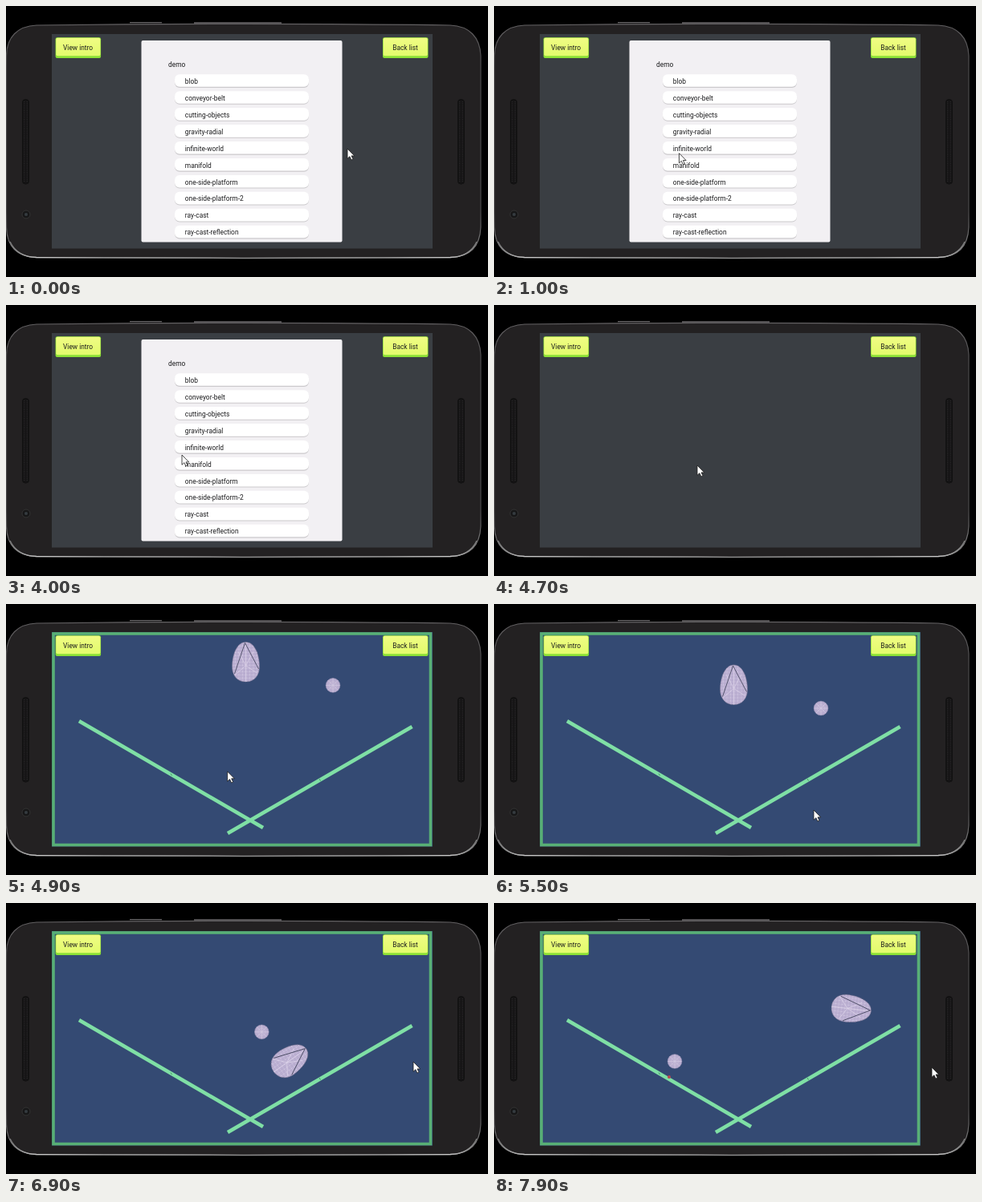
Write an HTML page that moves like this. It is 600 px wide and 338 px high and loops after 8000 ms.

```html
<!DOCTYPE html>
<html lang="en">
<head>
<meta charset="utf-8">
<title>Physics demo on a phone</title>
<style>
  html, body { margin: 0; width: 100%; height: 100%; overflow: hidden; background: #000; }
  svg { display: block; width: 600px; height: 338px; }
  text { font: 8.4px Roboto, Arial, sans-serif; fill: #1c1c1e; }
</style>
</head>
<body>
<svg viewBox="0 0 600 338">
  <defs>
    <linearGradient id="rim" x1="0" y1="0" x2="0" y2="1">
      <stop offset="0" stop-color="#626062"/><stop offset=".2" stop-color="#4a494a"/>
      <stop offset=".8" stop-color="#4a494a"/><stop offset="1" stop-color="#8c8b8c"/>
    </linearGradient>
    <linearGradient id="shine">
      <stop offset="0" stop-color="#777"/><stop offset=".06" stop-color="#ccc"/>
      <stop offset=".2" stop-color="#8c8c8c"/><stop offset=".8" stop-color="#8c8c8c"/>
      <stop offset=".94" stop-color="#ccc"/><stop offset="1" stop-color="#777"/>
    </linearGradient>
    <linearGradient id="lime" x1="0" y1="0" x2="0" y2="1">
      <stop offset="0" stop-color="#f0fc84"/><stop offset="1" stop-color="#e2fb6c"/>
    </linearGradient>
    <pattern id="mesh" width="4.5" height="4" patternUnits="userSpaceOnUse">
      <path d="M0 0V4M0 0H4.5" stroke="#e3daee" stroke-width=".7" stroke-dasharray="1 .6"/>
    </pattern>
    <g id="speaker">
      <rect x="20.5" y="116.5" width="8" height="105.5" rx="3.5" fill="#151415" stroke="#111"/>
      <path d="M22.8 119V220M26.2 119V220" stroke="#323132" stroke-dasharray="1 1.2"/>
    </g>
  </defs>

  <rect width="600" height="338" fill="#000"/>
  <g id="phone">
    <path d="M154 20.6H194M234 21H343" stroke="#6c6a6c" stroke-width="1.4"/>
    <path d="M38 24Q165 22.3 296 22.3T553 24C577 25 590 39 591 62V276C590 300 577 313 553 313.6Q425 314.5 296 314.5T38 313.6C14 313 1 300 .5 276V62C1 39 14 25 38 24Z"
      fill="#232122" stroke="url(#rim)" stroke-width="1.2"/>
    <path d="M5 294C11 307 22 313 38 313.6Q165 314.5 296 314.5T553 313.6C569 313 580 307 586 294"
      fill="none" stroke="url(#shine)" stroke-width="1.5"/>
    <use href="#speaker"/>
    <use href="#speaker" x="542"/>
    <circle cx="25" cy="260" r="5" fill="#171718" stroke="#333"/>
    <circle cx="25" cy="260" r="2" fill="#353b40"/>
  </g>
  <rect x="57" y="35" width="474" height="267.5" fill="#3a3e43"/>

  <g id="list">
    <rect x="168.5" y="43" width="250" height="251.5" rx="2" fill="#f2f0f3"/>
    <text x="202" y="75.8">demo</text>
  </g>

  <g id="world">
    <rect x="57" y="35" width="474" height="267.5" fill="#344a73"/>
    <rect x="59" y="37" width="469.5" height="263.5" fill="none" stroke="#58b075" stroke-width="3.6"/>
    <path d="M91 146L320 279M276 286L505.5 153" stroke="#7fdfa5" stroke-width="4.6"/>
    <path d="M205 211.5l1.6 2.6M390 218l1.5 2.6" stroke="#44795f" stroke-width=".8"/>
    <g id="egg">
      <path id="eggShape" d="M0-24.5C11.500-24.500 17-8 17 6C17 18 10 25 0 25S-17 18-17 6C-17-8-11.500-24.500 0-24.500Z"/>
      <path d="M0 5V25M0 5L-13 16M0 5L14 14M0 5L-9-12M0 5L9-12M0 5V-22" stroke="#ded5ea" stroke-width=".7"/>
      <path d="M-14 15L-1-23.5L16 9" fill="none" stroke="#494a63" stroke-width=".9"/>
    </g>
    <g id="ball">
      <circle r="8.8" fill="#b9add0" stroke="#a49bbd" stroke-width=".6"/>
      <path d="M-8.5 0H8.5M0-8.5V8.5M-6-6L6 6M-6 6L6-6" stroke="#d3cae1" stroke-width=".7"/>
      <circle r="4.5" fill="none" stroke="#cbc1db" stroke-width=".6"/>
    </g>
    <circle id="contact" r="2" fill="#bb4550"/>
  </g>

  <g id="buttons"></g>
  <path id="cursor" d="M0 0V12.3L2.9 9.7L4.9 14L7 13L5 8.9H8.7Z" fill="#fff" stroke="#1c1c1c" stroke-width=".8"/>
</svg>

<script>
const LOOP = 8000, STEP = 100, GRAVITY = 125;
const LIST_END = 4600, WORLD_START = 4800, DROP = 4820;
const $ = id => document.getElementById(id);
const mix = (a, b, p) => a + (b - a) * p;

function add(parent, tag, attrs, label) {
  const node = document.createElementNS('http://www.w3.org/2000/svg', tag);
  for (const key in attrs) node.setAttribute(key, attrs[key]);
  if (label) node.textContent = label;
  parent.append(node);
}

const demos = ['blob', 'conveyor-belt', 'cutting-objects', 'gravity-radial', 'infinite-world',
  'manifold', 'one-side-platform', 'one-side-platform-2', 'ray-cast', 'ray-cast-reflection'];
demos.forEach((name, i) => {
  const y = 85.2 + i * 20.95;
  const row = { x: 210, width: 167, height: 15.6, rx: 6 };
  add($('list'), 'rect', { ...row, y: y + 1.1, fill: '#cbc9cc' });
  add($('list'), 'rect', { ...row, y, fill: '#fff' });
  add($('list'), 'text', { x: 222.8, y: y + 11.6 }, name);
});

function addButton(x, label) {
  const g = $('buttons');
  add(g, 'rect', { x, y: 39.3, width: 56.5, height: 25.6, rx: 2, fill: '#8be035' });
  add(g, 'rect', { x: x + .7, y: 39.8, width: 55.1, height: 22.4, rx: 2, fill: 'url(#lime)' });
  add(g, 'text', { x: x + 28, y: 55.3, 'text-anchor': 'middle' }, label);
}
addButton(61.6, 'View intro');
addButton(469, 'Back list');

const eggShape = $('eggShape'), eggMesh = eggShape.cloneNode();
eggShape.setAttribute('fill', '#b9add0');
eggMesh.removeAttribute('id');
eggMesh.setAttribute('fill', 'url(#mesh)');
eggMesh.setAttribute('stroke', '#746f8c');
eggMesh.setAttribute('stroke-width', '.7');
eggMesh.setAttribute('stroke-dasharray', '2 1');
eggShape.after(eggMesh);

// Resting places of the pointer: time, x, y.
const stops = [[0, 425, 178], [800, 227, 184], [2000, 273, 179], [3200, 230, 211], [4000, 219, 187],
  [4400, 253, 200], [4700, 253, 200], [5500, 398, 257], [6900, 507, 198], [7100, 564, 212], [7900, 545, 205]];

// Release, bounces and last pose of each body: time, x, y, angle.
const eggPath = [[DROP, 298.5, 71.6, 0], [6430, 298.5, 233.6, 0], [7345, 406, 186, 106], [7900, 445, 132, 97]];
const ballPath = [[DROP, 407, 101, 0], [6090, 407, 202, 0], [7780, 222, 209, 0], [7900, 225, 197.5, 0]];

function between(path, t) {
  t = Math.max(path[0][0], t);
  const i = Math.max(1, path.findIndex(k => k[0] >= t));
  const a = path[i - 1], b = path[i];
  return { a, b, span: (b[0] - a[0]) / 1000, p: (t - a[0]) / (b[0] - a[0]) };
}

function glide(path, t) {
  const { a, b, p } = between(path, t), e = p * p * (3 - 2 * p);
  return [mix(a[1], b[1], e), mix(a[2], b[2], e)];
}

// Ballistic arc through both ends of the current flight.
function fly(path, t) {
  const { a, b, span, p } = between(path, t);
  const lift = GRAVITY / 2 * span * span * p * (1 - p);
  return [mix(a[1], b[1], p), mix(a[2], b[2], p) - lift, mix(a[3], b[3], p)];
}

function place(id, [x, y, angle = 0]) {
  $(id).setAttribute('transform', `translate(${x} ${y}) rotate(${angle})`);
}
function show(id, on) { $(id).style.display = on ? '' : 'none'; }

// A red dot where the ball has just touched a ramp.
function markContact(t) {
  const hit = ballPath.slice(1, -1).find(([time]) => t >= time && t < time + 150);
  show('contact', hit);
  if (hit) place('contact', [hit[1] + (hit[1] < 300 ? -4 : 4), hit[2] + 8]);
}

function render(t) {
  show('list', t < LIST_END);
  show('world', t >= WORLD_START);
  place('cursor', glide(stops, t));
  place('egg', fly(eggPath, t));
  place('ball', fly(ballPath, t));
  markContact(t);
}

const start = performance.now();
function tick() {
  const t = (performance.now() - start) % LOOP;
  render(Math.floor(t / STEP) * STEP);
  requestAnimationFrame(tick);
}
render(0);
requestAnimationFrame(tick);
</script>
</body>
</html>
```
